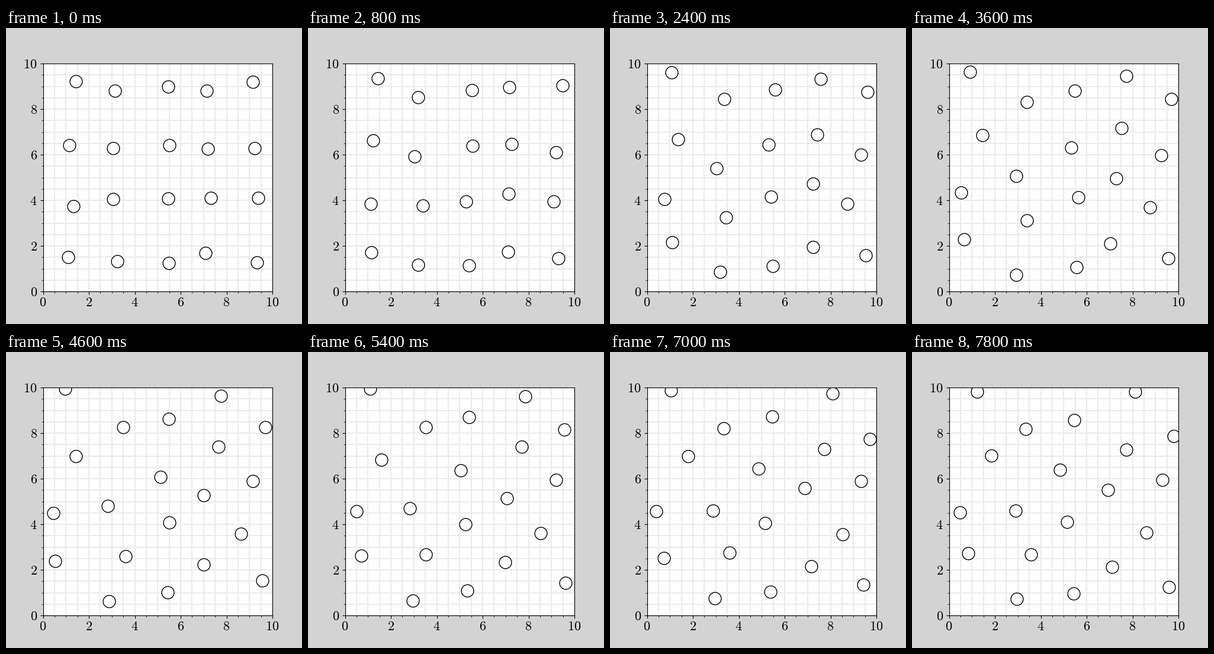
A matplotlib script for the animation above (8 s loop, 500x500 px).

```python
import numpy as np
import matplotlib.pyplot as plt
from matplotlib.animation import FuncAnimation
from matplotlib.ticker import MultipleLocator

FRAMES, STEP_MS = 40, 200

# Where the circles begin and end, in pixels from the top left, row by row
START = [
    (117, 89), (183, 105), (273, 98), (338, 105), (416, 90),
    (106, 197), (180, 202), (275, 197), (340, 203), (419, 202),
    (113, 300), (180, 288), (273, 287), (345, 286), (426, 286),
    (104, 386), (187, 393), (274, 396), (336, 379), (423, 395),
]
END = [
    (109, 66), (191, 129), (273, 114), (376, 66), (441, 141),
    (133, 174), (174, 267), (249, 198), (361, 164), (422, 215),
    (80, 270), (200, 341), (261, 286), (330, 232), (395, 304),
    (94, 339), (176, 416), (272, 407), (337, 362), (433, 396),
]


def random_paths(start, end, sigma=2, seed=4):
    """Random walks that drift from start to end, fast at first."""
    start, end = np.array(start), np.array(end)
    u = np.linspace(0, 1, FRAMES)[:, None, None]
    steps = np.random.default_rng(seed).normal(0, sigma, (FRAMES, *start.shape))
    walk = steps.cumsum(axis=0)
    jitter = walk - walk[0] - u * (walk[-1] - walk[0])
    ease = 1 - (1 - u) ** 2
    return start + ease * (end - start) + jitter


pixels = np.round(random_paths(START, END)) + 0.5
xs = (pixels[..., 0] - 62.5) / 38.75
ys = (445 - pixels[..., 1]) / 38.5

plt.rcParams["mathtext.fontset"] = "cm"
fig = plt.figure(figsize=(5, 5), dpi=100, facecolor="lightgray")
ax = fig.add_axes([0.125, 0.11, 0.775, 0.77])
ax.set(xlim=(0, 10), ylim=(0, 10))
for axis in (ax.xaxis, ax.yaxis):
    axis.set_major_locator(MultipleLocator(2))
    axis.set_minor_locator(MultipleLocator(0.5))
    axis.set_major_formatter("${x:.0f}$")
ax.tick_params(labelsize=16)
ax.tick_params(axis="x", pad=2.8)
ax.grid(which="both", color="#ebebeb", linewidth=1.5)

dots, = ax.plot([], [], "o", ms=15, mfc="white", mec="black", mew=1)


def update(i):
    dots.set_data(xs[i], ys[i])
    return dots,


anim = FuncAnimation(fig, update, frames=FRAMES, interval=STEP_MS,
                     repeat=True, repeat_delay=0)
plt.show()
```
